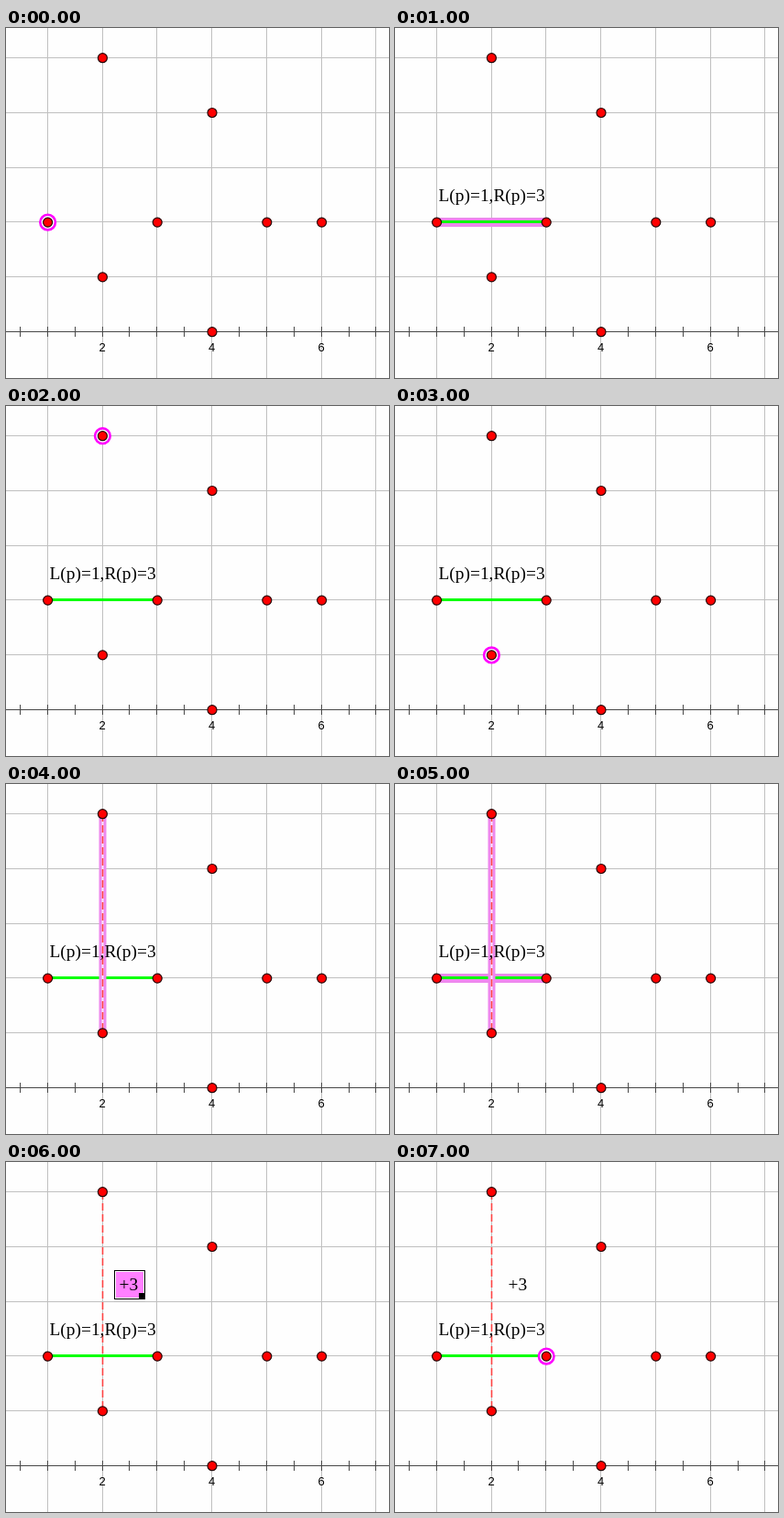
Animation of 418x382 px, one loop 8 s. Source, as an HTML page:

```html
<!DOCTYPE html>
<html lang="en">
<head>
<meta charset="utf-8">
<style>
  html, body { margin: 0; width: 100%; height: 100%; overflow: hidden; background: #fefefe; }
  svg { display: block; width: 418px; height: 382px; }
  .grid { stroke: #c0c0c0; shape-rendering: crispEdges; }
  .axis { stroke: #484848; shape-rendering: crispEdges; }
  .tick { font: 13px "Liberation Sans", Arial, sans-serif; text-anchor: middle; }
  .note { font: 19.4px "Liberation Serif", "Times New Roman", serif; }
  .dot { fill: #f00; stroke: #200; stroke-width: 1.2; }
  .band { stroke: #ee88ee; }
</style>
</head>
<body>
<svg viewBox="0 0 418 382">
  <g id="plane"></g>

  <g data-on="1 2 3 4 5 6 7">
    <path class="band" data-on="1 5" d="M48 212H163" stroke-width="10"/>
    <path d="M46 211.5H165" stroke="#0f0" stroke-width="3"/>
  </g>

  <g data-on="4 5 6 7">
    <g data-on="4 5">
      <path class="band" d="M105.5 37V269" stroke-width="8"/>
      <path d="M105.5 37V269" stroke="#fbe4fb" stroke-width="2"/>
    </g>
    <path d="M105.5 33V272" stroke="#f44" stroke-width="1.6" stroke-dasharray="8 4"/>
  </g>

  <g data-on="6">
    <rect x="118.5" y="118.5" width="33" height="31" fill="#fff" stroke="#000"/>
    <rect x="120" y="120" width="30" height="28" fill="#ff80ff"/>
    <rect x="145" y="143" width="6" height="6"/>
  </g>

  <text class="note" data-on="1 2 3 4 5 6 7" x="47.5" y="189">L(p)=1,R(p)=3</text>
  <text class="note" data-on="6 7" x="123.5" y="140">+3</text>

  <circle id="ring" r="8.3" fill="#fff" stroke="#f0f" stroke-width="2.6"/>
  <g id="dots"></g>
</svg>

<script>
  const STEP = 1000, STEPS = 8;
  const UNIT = 59.8;
  const px = x => 45.2 + (x - 1) * UNIT;
  const py = y => 331.5 - y * UNIT;
  const snap = v => Math.floor(v) + 0.5;
  const center = ([x, y]) => ({ cx: px(x) + 0.4, cy: py(y) + 0.2 });

  const points = [[1, 2], [2, 1], [2, 5], [3, 2], [4, 0], [4, 4], [5, 2], [6, 2]];
  const picked = { 0: [1, 2], 2: [2, 5], 3: [2, 1], 7: [3, 2] };

  const ring = document.getElementById("ring");
  const parts = [...document.querySelectorAll("[data-on]")]
    .map(el => ({ el, steps: el.dataset.on.split(" ").map(Number) }));

  function set(el, attrs) {
    for (const name in attrs) el.setAttribute(name, attrs[name]);
  }

  function add(parent, tag, attrs, text = "") {
    const el = document.createElementNS("http://www.w3.org/2000/svg", tag);
    set(el, attrs);
    el.textContent = text;
    document.getElementById(parent).append(el);
  }

  const line = (cls, d) => add("plane", "path", { class: cls, d });

  for (let x = 1; x <= 7; x++) line("grid", `M${snap(px(x))} 0V382`);
  for (let y = 1; y <= 5; y++) line("grid", `M0 ${snap(py(y))}H418`);
  line("axis", `M0 ${snap(py(0))}H418`);
  for (let x = 0.5; x <= 7; x += 0.5) line("axis", `M${snap(px(x))} 326V337`);
  for (const x of [2, 4, 6]) add("plane", "text", { class: "tick", x: px(x), y: 353 }, x);
  for (const p of points) add("dots", "circle", { class: "dot", r: 5, ...center(p) });

  function show(step) {
    for (const { el, steps } of parts) {
      el.style.display = steps.includes(step) ? "" : "none";
    }
    const spot = picked[step];
    ring.style.display = spot ? "" : "none";
    if (spot) set(ring, center(spot));
  }

  const start = performance.now();
  let current = 0;
  function tick(now) {
    const step = Math.floor(Math.max(0, now - start) / STEP) % STEPS;
    if (step !== current) show(current = step);
    requestAnimationFrame(tick);
  }
  show(0);
  requestAnimationFrame(tick);
</script>
</body>
</html>
```
